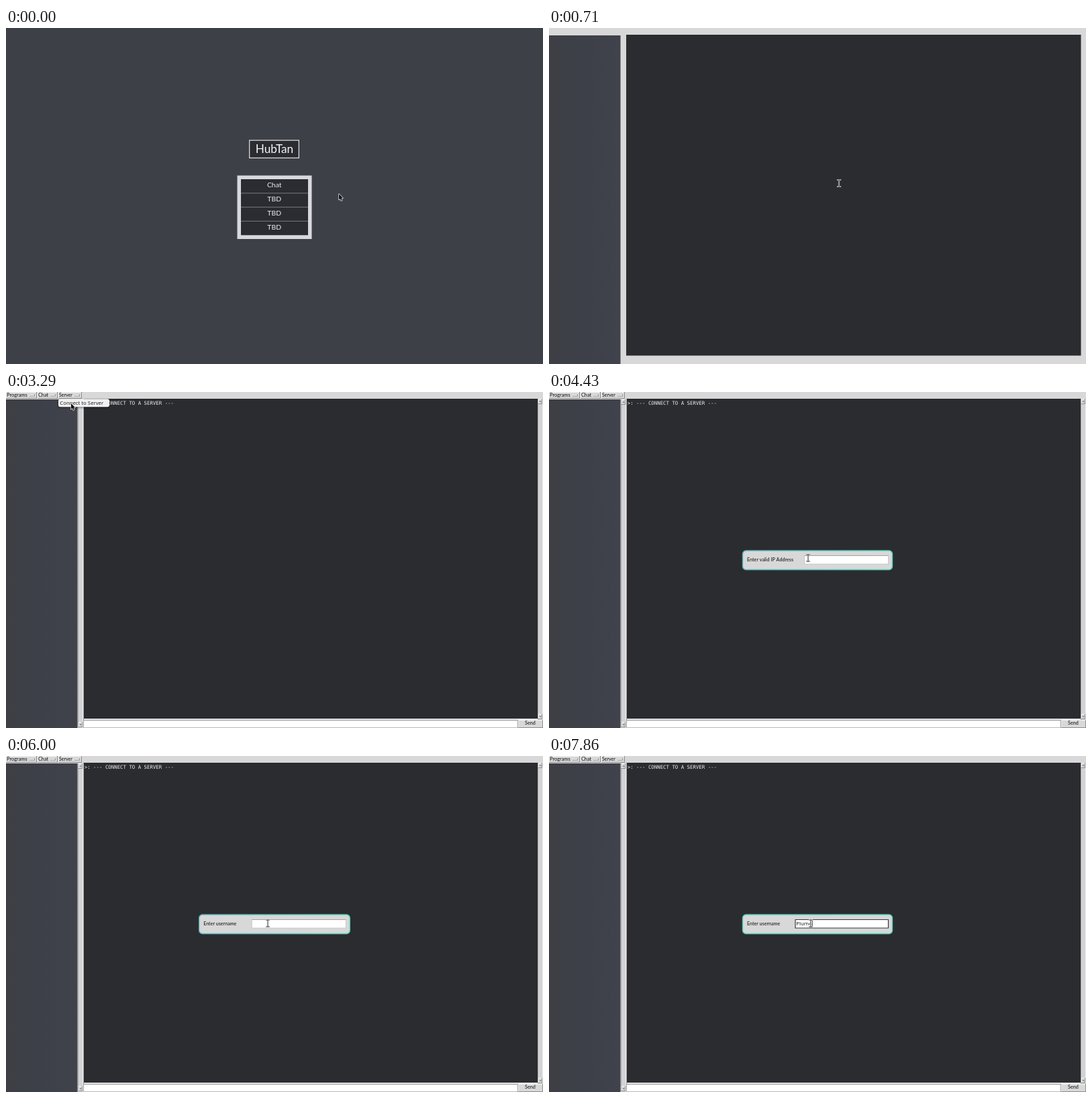
These frames come from a looping animation (800x500 px, 8 s). An HTML page with a canvas:

```html
<!DOCTYPE html>
<html lang="en">
<head>
<meta charset="utf-8">
<title>Chat client</title>
<style>
  html, body { margin: 0; width: 100%; height: 100%; overflow: hidden; background: #3e4048; }
  canvas { display: block; width: 800px; height: 500px; }
</style>
</head>
<body>
<canvas id="stage" width="800" height="500"></canvas>
<script>
const ctx = document.getElementById('stage').getContext('2d');
const LOOP = 8000, TICK = 1000 / 7;
const SLATE = '#3e4048', DARK = '#2b2c30', GREY = '#d8d8d8', INK = '#1c1c1c';
const LABEL = 'Lato, sans-serif', INPUT = '"Open Sans", sans-serif', MONO = '"DejaVu Sans Mono", monospace';
const TITLE = 'HubTan', ADDRESS = '127.0.0.1', USER = 'Plum4';

// Pointer stops: tick, x, y
const stops = [
  [0, 496, 247], [1, 490, 245], [4, 432, 231], [10, 432, 231], [11, 312, 150],
  [12, 228, 89], [13, 228, 89], [17, 91, 5], [20, 91, 5], [22, 97, 17], [24, 97, 17],
  [30, 384, 246], [31, 386, 247], [37, 386, 247], [39, 390, 249], [56, 390, 249]
];

const clamp = (v, lo, hi) => Math.max(lo, Math.min(hi, v));

function pointerAt(tick) {
  const i = stops.findIndex((s, n) => n > 0 && tick <= s[0]);
  const [t0, x0, y0] = stops[i - 1], [t1, x1, y1] = stops[i];
  const p = (tick - t0) / (t1 - t0), e = p * p * (3 - 2 * p);
  return [x0 + (x1 - x0) * e, y0 + (y1 - y0) * e];
}

function rect(x, y, w, h, fill) {
  ctx.fillStyle = fill;
  ctx.fillRect(x, y, w, h);
}

function frame(x, y, w, h, color, width = 1) {
  ctx.strokeStyle = color;
  ctx.lineWidth = width;
  ctx.strokeRect(x, y, w, h);
}

function round(x, y, w, h, r, fill) {
  ctx.beginPath();
  ctx.roundRect(x, y, w, h, r);
  ctx.fillStyle = fill;
  ctx.fill();
}

function text(str, x, y, size, family, color = INK, align = 'left', weight = 400) {
  ctx.font = `${weight} ${size}px ${family}`;
  ctx.textAlign = align;
  ctx.fillStyle = color;
  ctx.fillText(str, x, y);
  return ctx.measureText(str).width;
}

function bevel(x, y, w, h) {
  rect(x, y, w, h, '#8f8f91');
  rect(x, y, w - 1, h - 1, '#f2f2f2');
  rect(x + 1, y + 1, w - 2, h - 2, GREY);
}

function drawMenu() {
  rect(0, 0, 800, 500, SLATE);
  rect(362, 166.5, 75, 27.5, GREY);
  rect(363.3, 167.8, 72.4, 24.9, '#2a2c31');
  text(TITLE, 400, 185.5, 17.2, LABEL, '#f4f4f6', 'center');
  rect(344.5, 219.5, 111, 94.5, '#d8d9df');
  rect(350, 225, 100, 83.3, '#2a2c31');
  ['Chat', 'TBD', 'TBD', 'TBD'].forEach((name, i) => {
    text(name, 399.7, 237.4 + i * 20.8, 10.4, LABEL, '#f0f0f2', 'center');
    if (i) rect(350, 224.5 + i * 20.8, 100, 1, '#777980');
  });
}

function drawPanels() {
  rect(0, 0, 800, 500, GREY);
  const side = ctx.createLinearGradient(0, 0, 107, 0);
  side.addColorStop(0, '#3d3f44');
  side.addColorStop(0.5, '#3d4049');
  side.addColorStop(1, '#40434c');
  rect(0, 11, 106.5, 489, side);
  rect(115, 10, 677.5, 477.5, DARK);
}

function scrollbar(x, top, bottom, w) {
  rect(x, top, w, bottom - top, '#d3d3d5');
  rect(x, top, 1, bottom - top, '#a9a9ac');
  rect(x + w - 1, top, 1, bottom - top, '#efefef');
  [[top, -1], [bottom - 8, 1]].forEach(([y, dir]) => {
    bevel(x + 1, y, w - 2, 8);
    const cx = x + w / 2, cy = y + 4;
    ctx.beginPath();
    ctx.moveTo(cx - 2, cy - dir);
    ctx.lineTo(cx + 2, cy - dir);
    ctx.lineTo(cx, cy + 1.5 * dir);
    ctx.fillStyle = '#8c8c8f';
    ctx.fill();
  });
}

function drawControls() {
  [['Programs', 0, 46, 7.4], ['Chat', 47, 30, 7.3], ['Server', 78, 35, 7]].forEach(([name, x, w, size]) => {
    bevel(x, 0, w, 10);
    text(name, x + 1, 7, size, LABEL, INK, 'left', 500);
    bevel(x + w - 11, 3.5, 8, 3);
  });
  scrollbar(107, 11, 499, 8);
  scrollbar(792, 10, 487, 8);
  rect(115, 10, 1, 477, '#a5a6a8');
  rect(116, 486, 676, 2, '#e6e6e6');
  rect(115, 488, 648, 11.5, '#9b9b9d');
  rect(116, 489, 646, 10, '#fff');
  bevel(763, 488, 37, 12);
  text('Send', 781, 495.2, 7.2, LABEL, INK, 'center', 500);
  text('>: --- CONNECT TO A SERVER ---', 116.8, 19, 7.38, MONO, '#f0f0f0');
}

function drawDropdown() {
  ctx.save();
  ctx.shadowColor = '#0008';
  ctx.shadowBlur = 3;
  ctx.shadowOffsetY = 1;
  round(78, 10.3, 76, 12, 3, '#f1f1f1');
  ctx.restore();
  text('Connect to Server', 80.3, 18.9, 7.8, INPUT, '#161616');
}

function drawDialog(label, size, fieldX, value, focused, grow) {
  const x = 288.5 - grow, w = 223 + 2 * grow;
  const edge = ctx.createLinearGradient(x, 0, x + w, 0);
  edge.addColorStop(0, focused ? '#4fcdb8' : '#58afc0');
  edge.addColorStop(1, '#4ad2b4');
  round(x, 236, w, 28.5, 5, GREY);
  ctx.strokeStyle = edge;
  ctx.lineWidth = 1.4;
  ctx.stroke();
  text(label, 295 - grow, 251.8, size, LABEL, INK, 'left', 500);

  const fx = fieldX - grow, fw = 505.5 - fieldX + 2 * grow;
  rect(fx, 243.5, fw, 12.5, '#fff');
  frame(fx, 243.5, fw, 12.5, focused ? '#35363c' : '#c0c0c2', focused ? 1.2 : 0.8);
  if (!focused) rect(fx, 243, fw, 1, '#a2a2a4');
  const end = text(value, fx + 1.3, 252.4, 7.8, INPUT, '#111');
  if (focused) rect(fx + 1.8 + end, 245, 0.8, 9.5, '#222');
}

function drawArrow(x, y) {
  const shape = [[0, 0], [0, 8.6], [1.9, 6.9], [3.2, 10], [4.7, 9.3], [3.4, 6.4], [6, 6.2]];
  ctx.beginPath();
  shape.forEach(([dx, dy]) => ctx.lineTo(x + dx, y + dy));
  ctx.closePath();
  ctx.lineJoin = 'round';
  ctx.strokeStyle = '#e4e4e6';
  ctx.lineWidth = 1.5;
  ctx.stroke();
  ctx.fillStyle = '#111';
  ctx.fill();
}

function drawBeam(x, y) {
  [['#c4c5c8', 2.2], ['#4a4b50', 0.8]].forEach(([color, width]) => {
    ctx.beginPath();
    ctx.moveTo(x - 2, y - 5);
    ctx.lineTo(x + 2, y - 5);
    ctx.moveTo(x, y - 5);
    ctx.lineTo(x, y + 5);
    ctx.moveTo(x - 2, y + 5);
    ctx.lineTo(x + 2, y + 5);
    ctx.strokeStyle = color;
    ctx.lineWidth = width;
    ctx.lineCap = 'square';
    ctx.stroke();
  });
  ctx.lineCap = 'butt';
}

function draw(time) {
  const tick = Math.floor((time % LOOP + 5) / TICK);
  const inChat = tick >= 5;
  if (inChat) {
    drawPanels();
    if (tick >= 6) drawControls();
    if (tick >= 18 && tick < 25) drawDropdown();
    if (tick >= 27 && tick < 40) {
      const typed = ADDRESS.slice(0, clamp((tick - 32) * 2, 0, 9));
      drawDialog('Enter valid IP Address', 7.2, 380.5, typed, tick >= 32, 0);
    } else if (tick >= 41) {
      const focused = tick >= 45;
      drawDialog('Enter username', 7.1, 367, USER.slice(0, clamp(tick - 48, 0, 5)), focused, focused ? 0 : 0.8);
    }
  } else {
    drawMenu();
  }
  const [x, y] = pointerAt(Math.min(tick, 55));
  if (inChat && x > 116 && y > 11) drawBeam(x, y);
  else drawArrow(x, y);
}

function run() {
  draw(performance.now());
  requestAnimationFrame(run);
}
run();
</script>
</body>
</html>
```
